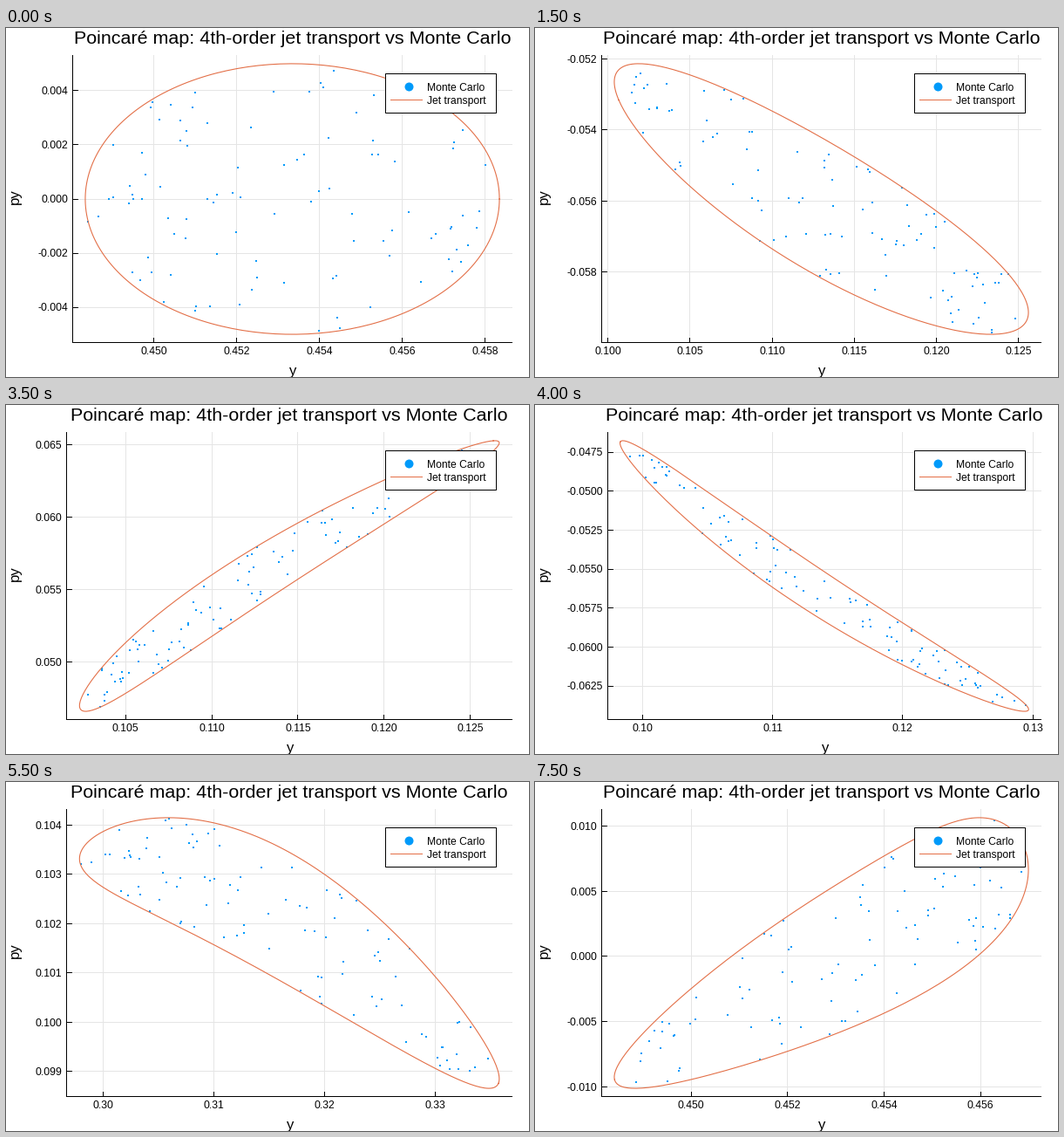
A matplotlib script for the animation above (8000 ms loop, 600 by 400 pixels).

```python
import numpy as np
import matplotlib.pyplot as plt
from matplotlib.animation import FuncAnimation
from matplotlib.patches import Rectangle

plt.rcParams["font.family"] = "Liberation Sans"

FRAMES = 16
ENERGY, Y0, RADIUS = 0.1025, 0.45335, 0.005
BLUE, ORANGE, GRID = "#009afa", "#e36f47", "#e5e5e5"
RIGHT, TOP, BOTTOM = 580.3, 31.6, 360.4
PX = 0.72  # points per pixel at 100 dpi


def flow(s):
    """Henon-Heiles equations of motion."""
    x, y, px, py = s
    return np.array([px, py, -x - 2 * x * y, -y - x * x + y * y])


def rk4(s, h):
    a = flow(s)
    b = flow(s + h / 2 * a)
    c = flow(s + h / 2 * b)
    d = flow(s + h * c)
    return s + h / 6 * (a + 2 * b + 2 * c + d)


def returns(u, v, h=0.02):
    """Successive (y, py) on the section x = 0, px > 0."""
    y, py = Y0 + RADIUS * u, RADIUS * v
    px = np.sqrt(2 * ENERGY - y**2 + 2 * y**3 / 3 - py**2)
    s = np.array([np.zeros_like(y), y, px, py])
    hits = np.zeros((FRAMES, 2, y.size))
    hits[0] = y, py
    seen = np.ones(y.size, int)
    for _ in range(10000):
        nxt = rk4(s, h)
        idx = np.flatnonzero((s[0] < 0) & (nxt[0] >= 0) & (seen < FRAMES))
        if idx.size:
            c = nxt[:, idx]
            for _ in range(3):  # Newton steps onto x = 0
                c = rk4(c, -c[0] / c[2])
            hits[seen[idx], :, idx] = c[[1, 3]].T
            seen[idx] += 1
            if seen.min() == FRAMES:
                break
        s = nxt
    return hits


def monte_carlo(n=100):
    """Orbits started at random in the disc."""
    rng = np.random.default_rng(4)
    angle = rng.uniform(0, 2 * np.pi, n)
    r = np.sqrt(rng.uniform(0, 1, n))
    return returns(r * np.cos(angle), r * np.sin(angle))


def jet_curves(n=240, order=4):
    """Taylor polynomial of the map along each ray, summed at full radius."""
    angle = np.linspace(0, 2 * np.pi, n)
    r = np.linspace(-0.3, 0.3, 7)
    rays = returns(np.outer(r, np.cos(angle)).ravel(),
                   np.outer(r, np.sin(angle)).ravel())
    inv = np.linalg.inv(np.vander(r, increasing=True))
    weights = inv[:order + 1].sum(axis=0)
    return np.einsum("r,fcrn->fcn", weights, rays.reshape(FRAMES, 2, r.size, n))


points = monte_carlo()
curves = jet_curves()


def limits(*data):
    lo, hi = min(d.min() for d in data), max(d.max() for d in data)
    pad = 0.03 * (hi - lo)
    return lo - pad, hi + pad


def ticks(lo, hi):
    """Nice tick values and their labels."""
    base = np.floor(np.log10(hi - lo))
    for digit in (1, 5, 2, 2.5):
        for power in (base, base - 1):
            step = digit * 10.0**power
            k = np.arange(np.ceil(lo / step), np.floor(hi / step) + 1)
            if 4 <= k.size <= 7:
                places = int(-power) + (digit == 2.5)
                return k * step, [f"{t + 0.0:.{places}f}" for t in k * step]
    return np.array([]), []


fig = plt.figure(figsize=(6, 4), dpi=100, facecolor="white")
ax = fig.add_axes([0, 0, 1, 1])


def rule(xa, ya, xb, yb, color="black", z=3):
    """Straight line; the half pixel offsets the renderer's snapping."""
    ax.plot((xa - 0.5, xb - 0.5), (ya - 0.5, yb - 0.5), color=color, lw=PX,
            zorder=z)


def text(x, y, s, size, ha="center", va="baseline", z=4, **kw):
    ax.text(x, y, s, fontsize=size * PX, ha=ha, va=va, zorder=z, **kw)


def legend():
    ax.add_patch(Rectangle((435, 52), 127, 45, fc="white", ec="black", lw=PX,
                           zorder=6))
    ax.plot(462, 67.3, "o", color=BLUE, ms=10 * PX, mew=0, zorder=7,
            snap=False)
    rule(441.5, 82.5, 477.5, 82.5, ORANGE, z=7)
    text(483, 72, "Monte Carlo", 12.1, "left", z=7)
    text(483, 87, "Jet transport", 12.1, "left", z=7)


def draw(i):
    ax.cla()
    ax.set(xlim=(0, 600), ylim=(400, 0))
    ax.axis("off")

    cloud, curve = points[i], curves[i]
    (x0, x1), (y0, y1) = (limits(cloud[c], curve[c]) for c in (0, 1))
    (xt, xl), (yt, yl) = ticks(x0, x1), ticks(y0, y1)
    left = 76.7 + 6.8 * (max(map(len, yl), default=6) - 6)

    def sx(v):
        return left + (v - x0) / (x1 - x0) * (RIGHT - left)

    def sy(v):
        return BOTTOM - (v - y0) / (y1 - y0) * (BOTTOM - TOP)

    for x, s in zip(sx(xt), xl):
        rule(x, TOP, x, BOTTOM, GRID, z=1)
        rule(x, BOTTOM, x, BOTTOM - 5)
        text(x, 374.5, s, 12.1)
    for y, s in zip(sy(yt), yl):
        rule(left, y, RIGHT, y, GRID, z=1)
        rule(left, y, left + 6, y)
        text(left - 5.5, y + 4.4, s, 12.1, "right")
    rule(left, TOP, left, BOTTOM)
    rule(left, BOTTOM, RIGHT, BOTTOM)

    ax.plot(sx(cloud[0]), sy(cloud[1]), "s", color=BLUE, ms=2 * PX, mew=0,
            zorder=4)
    ax.plot(sx(curve[0]), sy(curve[1]), color=ORANGE, lw=1.1 * PX, zorder=5)

    mid = (left + RIGHT) / 2
    text(mid, 18.3, "Poincaré map: 4th-order jet transport vs Monte Carlo", 21.5)
    text(mid, 398.3, "y", 16.8)
    text(10.7, 193.5, "py", 16.8, va="center", rotation=90)
    legend()
    return []


anim = FuncAnimation(fig, draw, frames=FRAMES, init_func=lambda: [],
                     interval=500, repeat=True, repeat_delay=0)
plt.show()
```
